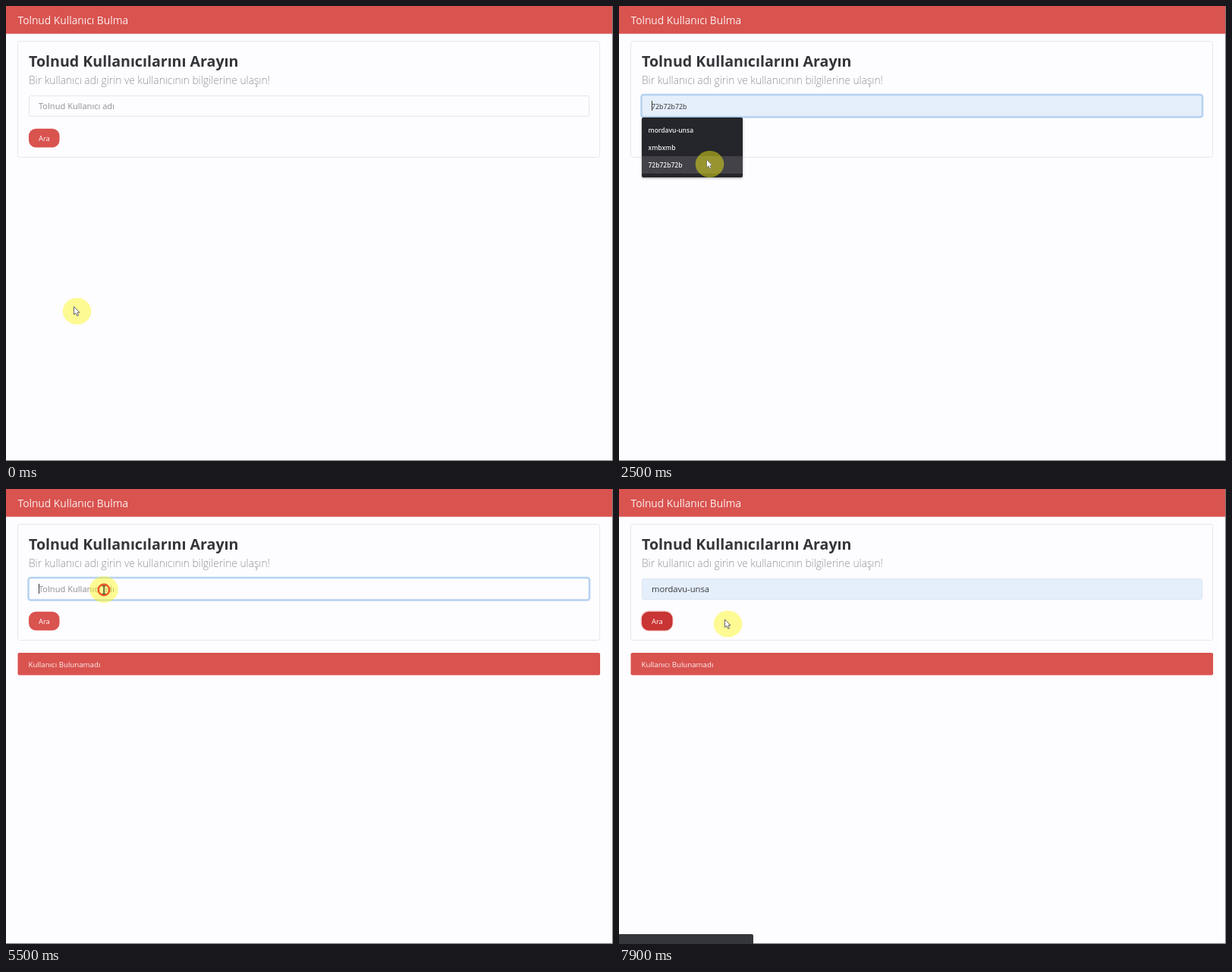
Write an HTML page with a canvas that moves like this. It is 800 px wide and 600 px high and loops after 8000 ms.

```html
<!DOCTYPE html>
<html lang="tr">
<head>
<meta charset="utf-8">
<title>Kullanıcı Bulma</title>
<style>
html, body { margin: 0; width: 100%; height: 100%; overflow: hidden; background: #fdfcfe; }
canvas { display: block; }
</style>
</head>
<body>
<canvas id="stage" width="800" height="600"></canvas>
<script>
const ctx = document.getElementById('stage').getContext('2d');
const LOOP = 8000, STEP = 100, CLICK = 200;
const RED = '#d9534f', DARK_RED = '#c93434', PAGE = '#fdfcfe', BLUE = '#e5eefb';
const BRAND = 'Tolnud';
const USERS = ['mordavu-unsa', 'xmbxmb', '72b72b72b'];
const MENU_TOP = 152, ROW = 23;

// Both searches run alike: click the field, open the menu, pick a name, press the button
const SEARCHES = [
  { click: 1300, open: 1400, pick: 2800, press: 3500, load: 4000, end: 4500, name: USERS[2], misspelt: true },
  { click: 5400, open: 5600, pick: 6100, press: 6800, load: 7200, end: LOOP, name: USERS[0] }
];
const RELOAD = SEARCHES[0].end;

const START = { x: 93.5, y: 402.5 }, FIELD = { x: 129, y: 132.5 }, BUTTON = { x: 57.5, y: 182.5 };
const LAST_ROW = { x: 119.5, y: 208.5 }, FIRST_ROW = { x: 99.5, y: 169 }, REST = { x: 143.5, y: 178 };

// Swing bends a move to the right and upwards
const MOVES = [
  { from: 0, until: 800, to: FIELD, swing: 155 },
  { from: 1400, until: 1900, to: LAST_ROW },
  { from: 2800, until: 3200, to: BUTTON },
  { from: 4600, until: 5300, to: FIELD },
  { from: 5600, until: 5900, to: FIRST_ROW },
  { from: 6200, until: 6700, to: BUTTON, swing: -28 },
  { from: 7300, until: 7900, to: REST }
];

const within = (t, a, b) => t >= a && t < b;
const ease = k => k * k * (3 - 2 * k);

function pointerAt(t) {
  let spot = START;
  for (const { from, until, to, swing = 0 } of MOVES) {
    if (t < from) break;
    const k = Math.min(1, (t - from) / (until - from));
    const bend = swing * Math.sin(Math.PI * k) ** 2;
    spot = {
      x: spot.x + (to.x - spot.x) * ease(k) + bend,
      y: spot.y + (to.y - spot.y) * ease(k) - bend
    };
  }
  return spot;
}

function stateAt(t) {
  const { x, y } = pointerAt(t);
  const s = t < RELOAD ? SEARCHES[0] : SEARCHES[1];
  const menu = within(t, s.open, s.pick);
  return {
    x, y, menu,
    row: menu && y > MENU_TOP ? Math.min(2, Math.floor((y - MENU_TOP) / ROW)) : -1,
    value: t >= s.pick ? s.name : '',
    misspelt: s.misspelt && t < s.load,
    focus: within(t, s.click, s.press + STEP),
    pressed: t > s.press,
    hover: !menu && x > 30 && x < 70 && y > 165 && y < 194,
    fresh: within(t, RELOAD, RELOAD + CLICK),
    loading: t >= s.load || within(t, RELOAD, RELOAD + CLICK),
    alert: t >= RELOAD,
    clicking: [s.click, s.pick - STEP, s.press].some(c => within(t, c, c + CLICK))
  };
}

function text(str, x, y, size, color, weight = 400) {
  ctx.font = `${weight} ${size}px "Open Sans", "Noto Sans", sans-serif`;
  ctx.fillStyle = color;
  ctx.fillText(str, x, y);
  return ctx.measureText(str).width;
}

function rect(x, y, w, h, color) {
  ctx.fillStyle = color;
  ctx.fillRect(x, y, w, h);
}

function box(x, y, w, h, r, fill, stroke, line = 1) {
  ctx.beginPath();
  ctx.roundRect(x, y, w, h, r);
  if (fill) { ctx.fillStyle = fill; ctx.fill(); }
  if (stroke) { ctx.strokeStyle = stroke; ctx.lineWidth = line; ctx.stroke(); }
}

function drawPage() {
  rect(0, 0, 800, 600, PAGE);
  rect(0, 0, 800, 36.6, RED);
  text(BRAND + ' Kullanıcı Bulma', 15.5, 23.5, 13.75, '#fbeeee', 500);
  box(15.5, 46.5, 767, 153, 3, null, '#e7e6e9');
  text(BRAND + ' Kullanıcılarını Arayın', 30, 80, 19.6, '#33353a', 700);
  text('Bir kullanıcı adı girin ve kullanıcının bilgilerine ulaşın!', 30, 103, 13.75, '#929295', 300);
}

function drawInput(s) {
  const preview = USERS[s.row];
  const filled = s.value || preview;
  const fill = filled ? BLUE : PAGE;
  if (s.focus) box(29.5, 117, 739.5, 29.5, 3, fill, '#b5d2f1', 2.5);
  else box(30.5, 118.5, 738, 27, 2.5, fill, filled ? '#dbe5f2' : '#e6e6ea');

  let caret = 43;
  if (s.value) {
    const width = text(s.value, 43, 136, 11.2, '#33373d');
    if (s.misspelt) rect(43, 138, width, 1, '#e0605c');
    caret += Math.round(width);
  } else if (preview) {
    text(preview, 43, 136, 8.8, '#2a2d31');
  } else {
    text(BRAND + ' Kullanıcı adı', 43, 136, 11.1, '#8f8f94');
  }
  if (s.focus) rect(caret, 125, 1, 13, '#333');
}

function drawButton(s) {
  const dark = (s.hover || s.pressed) && !s.fresh;
  if (s.pressed) box(28.5, 160.5, 43, 27, 11, '#f3c4c2');
  box(30, 161.7, 40.5, 24.8, 9.5, dark ? DARK_RED : RED);
  text('Ara', 43, 177.5, 9.4, '#fff');
}

function drawMenu(s) {
  ctx.save();
  ctx.shadowColor = 'rgba(0,0,0,.35)';
  ctx.shadowBlur = 3;
  ctx.shadowOffsetY = 1;
  box(30, 147, 133, 79, 2, '#24262b');
  ctx.restore();
  if (s.row >= 0) rect(30, MENU_TOP + s.row * ROW, 133, ROW, '#424248');
  USERS.forEach((name, i) => text(name, 38.5, MENU_TOP + 15 + i * ROW, 8.5, '#ececee', 600));
}

function drawBeam() {
  rect(-0.6, -5, 1.4, 11, '#47472f');
  for (const y of [-5.2, 5.2]) rect(-2.5, y, 5, 1.1, '#47472f');
}

function drawHand() {
  const ink = '#4a3a32';
  box(-1.2, 0, 2.6, 11, 1.3, '#fff', ink);
  box(-4, 6, 10.5, 9, 3, '#fff', ink);
  rect(-0.7, 2, 1.6, 7, '#fff');
}

function drawArrow(ink) {
  const shape = new Path2D('M0 0V10.5L2.5 8.4 4.3 12.3 6 11.5 4.4 7.7H7.5Z');
  ctx.fillStyle = '#fff';
  ctx.fill(shape);
  ctx.strokeStyle = ink;
  ctx.lineWidth = 0.9;
  ctx.stroke(shape);
}

function drawPointer(s) {
  ctx.fillStyle = 'rgba(252,246,20,.46)';
  ctx.beginPath();
  ctx.ellipse(s.x, s.y, 18.8, 17.5, 0, 0, 7);
  ctx.fill();

  const beam = s.y > 117 && s.y < 147;
  ctx.save();
  ctx.translate(s.x, s.y);
  if (s.hover) ctx.translate(-1, -7);
  else if (!beam) ctx.translate(-4, -6);
  if (s.clicking) {
    ctx.strokeStyle = '#ee5a26';
    ctx.lineWidth = 2.4;
    ctx.beginPath();
    ctx.arc(0, 0.5, 7.3, 0, 7);
    ctx.stroke();
  }
  if (beam) drawBeam();
  else if (s.hover) drawHand();
  else drawArrow(s.menu ? '#77745a' : '#55535f');
  ctx.restore();
}

function draw(t) {
  const s = stateAt(t);
  drawPage();
  drawInput(s);
  drawButton(s);
  if (s.alert) {
    box(15.5, 216, 767.5, 29.5, 2, RED);
    text('Kullanıcı Bulunamadı', 29.5, 234.5, 9.7, '#fdeeee');
  }
  if (s.menu) drawMenu(s);
  rect(799, 0, 1, 600, '#77777b');
  rect(0, 599, 800, 1, '#77777b');
  if (s.loading) box(-3, 587, 180, 16, 2, '#35353c');
  drawPointer(s);
}

function tick() {
  draw(Math.floor(performance.now() % LOOP / STEP) * STEP);
  requestAnimationFrame(tick);
}
tick();
</script>
</body>
</html>
```
